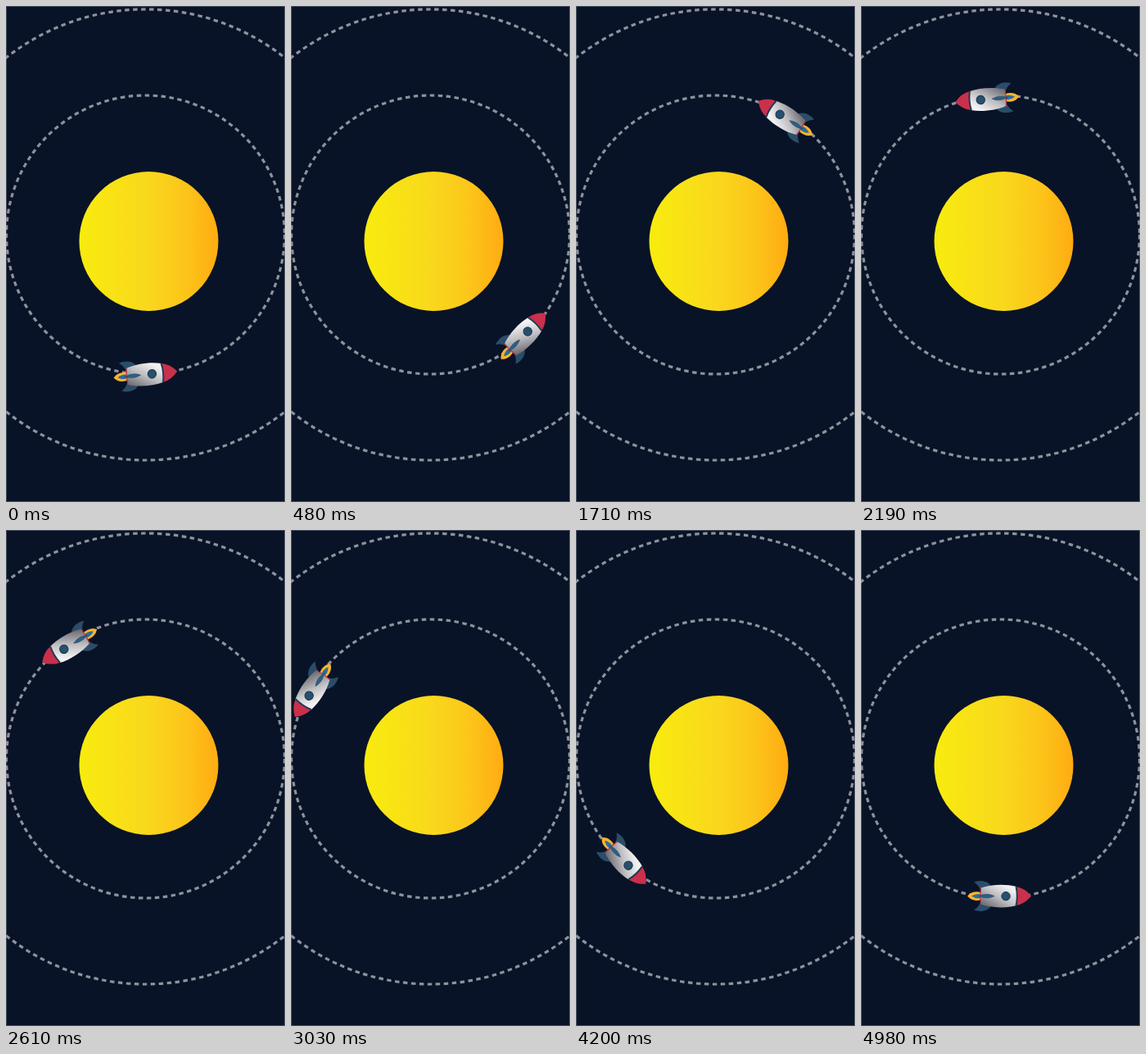
Animation of 341 by 605 pixels, one loop 5010 ms. Source, as an HTML page:

```html
<!DOCTYPE html>
<html lang="en">
<head>
<meta charset="utf-8">
<title>Rocket in orbit</title>
<style>
  html, body { margin: 0; width: 100%; height: 100%; overflow: hidden; background: #091327; }
  svg { display: block; width: 100%; height: 100%; }
</style>
</head>
<body>
<svg viewBox="0 0 341 605">
  <defs>
    <linearGradient id="sunFill">
      <stop offset="0" stop-color="#f8ec0e"/>
      <stop offset=".5" stop-color="#f9d71d"/>
      <stop offset=".75" stop-color="#fcc61a"/>
      <stop offset="1" stop-color="#ffab12"/>
    </linearGradient>
    <linearGradient id="hullFill" x1=".1" y1=".85" x2=".8" y2=".15">
      <stop offset="0" stop-color="#737378"/>
      <stop offset=".5" stop-color="#bebec1"/>
      <stop offset="1" stop-color="#f2f2f3"/>
    </linearGradient>
  </defs>

  <rect x=".5" y=".5" width="340" height="604" fill="#091327" stroke="#454c5b"/>
  <g fill="none" stroke="#8d929c" stroke-width="3.200" stroke-dasharray="5.500 4.500">
    <circle cx="170.5" cy="279" r="275"/>
    <circle cx="170.5" cy="279" r="170"/>
  </g>
  <circle cx="174.5" cy="287" r="85" fill="url(#sunFill)"/>

  <g id="rocket">
    <g fill="#2a4d69">
      <path id="fin" d="M-10-12C-14-18.500-23-20-31-17C-26-14-24-10-22-5Z"/>
      <use href="#fin" transform="scale(1 -1)"/>
    </g>
    <path d="M-39 0C-35-5-29-6.500-22-4.500V4.500C-29 6.500-35 5-39 0Z" fill="#f9b42d"/>
    <path d="M-34 0Q-28-4-22-2V2Q-28 4-34 0Z" fill="#2b6d99"/>
    <path d="M-22.500-10C-10-14.500 8-15 21-11.500Q23 0 21 11.500C8 15-10 14.500-22.500 10Q-24 0-22.500-10Z" fill="url(#hullFill)"/>
    <path d="M-22.500-10Q-24 0-22.500 10" fill="none" stroke="#b8354c" stroke-width="1.300"/>
    <path d="M20-11.500Q31-10 39 0Q31 10 20 11.500Q22.500 0 20-11.500Z" fill="#c9304b"/>
    <path d="M20.500-11.500Q23 0 20.500 11.500" fill="none" stroke="#1d3a58" stroke-width="2"/>
    <circle cx="8" r="5.200" fill="#28506c" stroke="#173650"/>
    <path d="M-25 0Q-15-4.500-6 0Q-15 4.500-25 0Z" fill="#2d5f85" stroke="#1d3a58" stroke-width=".5"/>
  </g>
</svg>
<script>
  const LOOP = 5010, STEP = 30;
  const CENTER = { x: 170.5, y: 279.8 }, ORBIT = 166.8;
  const rocket = document.getElementById('rocket');

  // Times in ms; angles in degrees, counterclockwise from the lowest point.
  const times = [0, 540, 1080, 1620, 2190, 2700, 3240, 3780, 4200, 4320, 4860, 4980];
  const orbitAngles = [0, 48, 96.6, 142, 185.6, 219.6, 252.8, 291.3, 317.8, 327, 358.8, 359.5];
  const headings = [6, 51, 96.5, 140.5, 185, 216.6, 249.2, 287.5, 313.4, 322, 359, 360];

  // Monotone cubic curve through the given values.
  function smoothCurve(values) {
    const last = times.length - 1;
    const rates = times.slice(1).map((t, i) => (values[i + 1] - values[i]) / (t - times[i]));
    const slopes = times.map((_, i) => {
      if (i === 0) return rates[0];
      if (i === last) return rates[last - 1];
      return 2 * rates[i - 1] * rates[i] / (rates[i - 1] + rates[i]);
    });
    return t => {
      let i = 0;
      while (i < last - 1 && t > times[i + 1]) i++;
      const span = times[i + 1] - times[i];
      const u = (t - times[i]) / span, v = 1 - u;
      return v * v * ((1 + 2 * u) * values[i] + u * span * slopes[i])
           + u * u * ((3 - 2 * u) * values[i + 1] - v * span * slopes[i + 1]);
    };
  }

  const orbitAt = smoothCurve(orbitAngles);
  const headingAt = smoothCurve(headings);

  function draw(now) {
    const t = Math.floor(now % LOOP / STEP) * STEP;
    const angle = orbitAt(t) * Math.PI / 180;
    const radius = ORBIT + 3 * Math.max(0, 1 - t / 540);
    const x = CENTER.x + radius * Math.sin(angle);
    const y = CENTER.y + radius * Math.cos(angle);
    rocket.setAttribute('transform', `translate(${x} ${y}) rotate(${-headingAt(t)})`);
  }

  const start = performance.now();
  function tick() {
    draw(performance.now() - start);
    requestAnimationFrame(tick);
  }
  tick();
</script>
</body>
</html>
```
